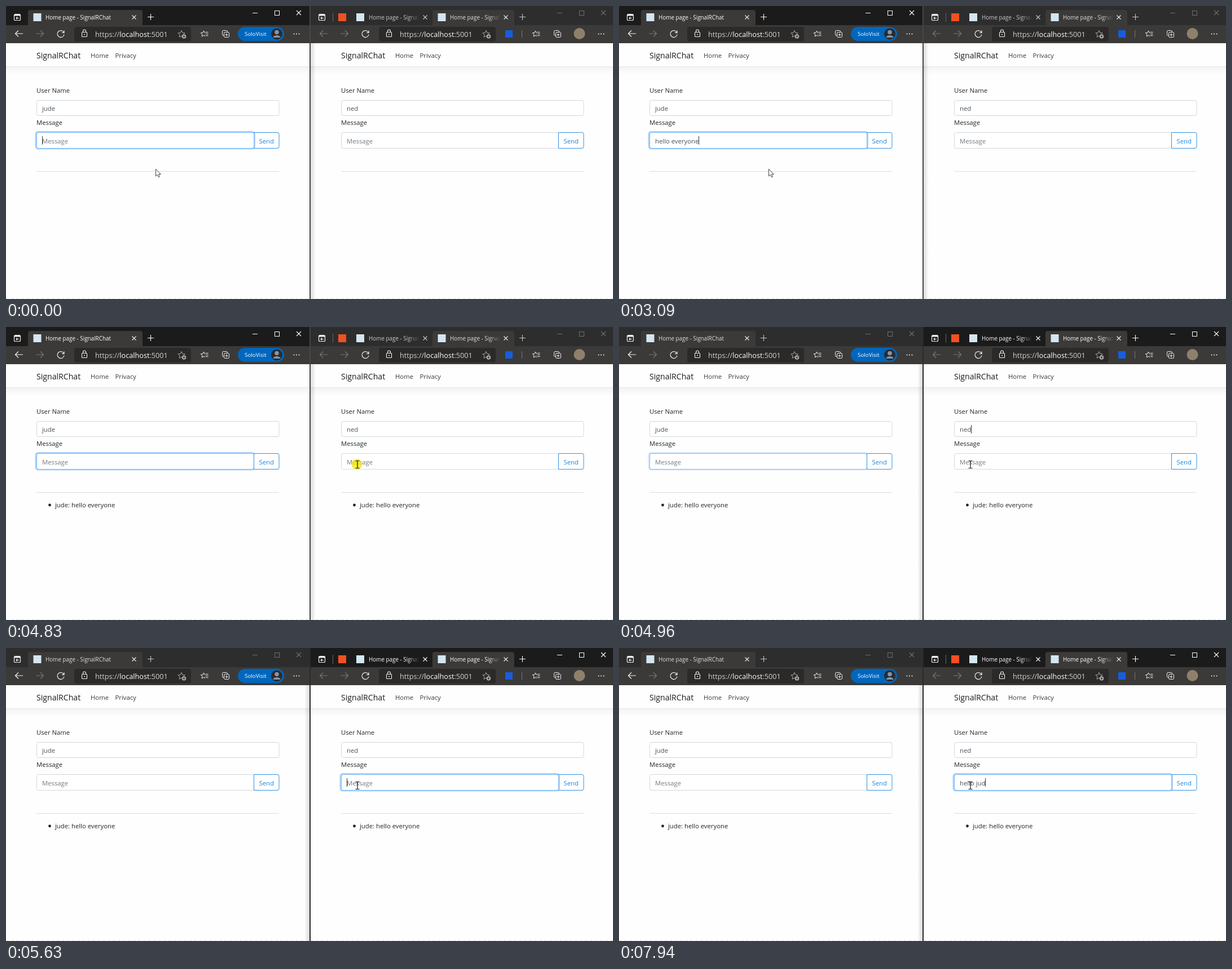
An HTML page with a canvas that plays this animation: 1076x520 px, repeating every 8 s.

```html
<!DOCTYPE html>
<html lang="en">
<head>
<meta charset="utf-8">
<title>SignalRChat</title>
<style>
  html, body { margin: 0; width: 100%; height: 100%; overflow: hidden; background: #fff; }
  canvas { display: block; }
</style>
</head>
<body>
<canvas id="stage" width="1076" height="520"></canvas>
<script>
const ctx = document.getElementById('stage').getContext('2d');
const LOOP = 8000;
const USERS = ['jude', 'ned'];
const MESSAGES = ['hello everyone', 'hello jude'];
// Time at which each character is typed
const KEYS = [
  [620, 790, 1000, 1130, 1360, 1440, 1740, 1970, 2070, 2280, 2560, 2810, 2940, 3090],
  [6160, 6340, 6470, 6620, 6800, 6930, 7480, 7660, 7940]
];
const SENT = 3550, RECEIVED = 3610, BLUR = 4830, SWITCH = 4880, FOCUS = 5140;
const POINTER = [
  [0, 265, 289], [4030, 325, 279], [4080, 430, 281], [4130, 553, 289], [4170, 631, 293],
  [4380, 631, 286], [4430, 629, 272], [4490, 626, 258], [4540, 623, 247], [4600, 623, 244]
];
const BODY = 11.3;

const between = (t, a, b) => t >= a && t < b;
const ramp = (t, a, b) => Math.min(1, Math.max(0, (t - a) / (b - a)));

function rect(x, y, w, h, color) {
  ctx.fillStyle = color;
  ctx.fillRect(x, y, w, h);
}

function rounded(x, y, w, h, r, fill, stroke, width = 1) {
  ctx.beginPath();
  ctx.roundRect(x, y, w, h, r);
  if (fill) { ctx.fillStyle = fill; ctx.fill(); }
  if (stroke) { ctx.strokeStyle = stroke; ctx.lineWidth = width; ctx.stroke(); }
}

function disc(x, y, r, color) {
  ctx.fillStyle = color;
  ctx.beginPath();
  ctx.arc(x, y, r, 0, 7);
  ctx.fill();
}

function path(d, x, y, color, width = 1.1, fill) {
  ctx.save();
  ctx.translate(x, y);
  const shape = new Path2D(d);
  if (fill) { ctx.fillStyle = fill; ctx.fill(shape); }
  ctx.strokeStyle = color;
  ctx.lineWidth = width;
  ctx.stroke(shape);
  ctx.restore();
}

// Returns the x position where the text ends
function text(s, x, y, size, color) {
  ctx.font = `${size}px "Open Sans", "Noto Sans", sans-serif`;
  ctx.fillStyle = color;
  ctx.fillText(s, x, y);
  return x + ctx.measureText(s).width;
}

function star(x, y, r, color) {
  let d = '';
  for (let i = 0; i < 10; i++) {
    const a = i * Math.PI / 5 - Math.PI / 2, k = i % 2 ? r * 0.48 : r;
    d += `${i ? 'L' : 'M'}${Math.cos(a) * k} ${Math.sin(a) * k}`;
  }
  path(d + 'Z', x, y, color, 1);
}

function favicon(x) {
  rect(x, 13, 14, 14, '#d3e7f1');
}

function tabTitle(x, color, clipWidth) {
  ctx.save();
  if (clipWidth) {
    ctx.beginPath();
    ctx.rect(x, 8, clipWidth, 25);
    ctx.clip();
    const fade = ctx.createLinearGradient(x + clipWidth - 18, 0, x + clipWidth, 0);
    fade.addColorStop(0, color);
    fade.addColorStop(1, 'rgba(200,200,200,0.1)');
    color = fade;
  }
  text('Home page - SignalRChat', x, 24, 9.87, color);
  ctx.restore();
}

const closeIcon = (x, y, r, color) =>
  path(`M${-r} ${-r}L${r} ${r}M${r} ${-r}L${-r} ${r}`, x, y, color);

function tabActions(x, color) {
  rounded(x - 5.5, 14.5, 11, 11, 2, null, color, 1.2);
  rect(x - 5, 15, 10, 2.5, color);
  path('M3 1.5H-2M0 -.5L-2 1.5L0 3.5', x, 20, color);
}

function titleBar(x, active, second) {
  const ink = active ? '#fff' : '#c8c8c8';
  const buttons = active ? '#fff' : '#6f6f6f';
  rect(x, 0, 540, 34, active ? '#1b1b1b' : '#2d2d2d');
  tabActions(x + 20, '#eee');
  const tabX = second ? 756 : 39, tabW = second ? 145 : 203;
  rounded(tabX, 7, tabW, 30, 4, '#3b3a39');
  if (second) {
    rect(579, 12, 1, 16, '#666');
    rect(589, 13, 14, 14, '#f25022');
    favicon(621);
    tabTitle(643, ink, 88);
    closeIcon(743, 20, 3.5, ink);
  }
  favicon(tabX + 9.5);
  tabTitle(second ? 787 : 70, active ? '#fff' : '#dedede', second ? 88 : 0);
  closeIcon(second ? 886 : 227, 20, 3.5, '#eee');
  path('M-5.5 0H5.5M0 -5.5V5.5', second ? 915.5 : 256.5, 19.5, ink);
  path('M-4.5 0H4.5', x + 441.5, 12.5, buttons, 1);
  ctx.strokeStyle = buttons;
  ctx.lineWidth = 1;
  ctx.strokeRect(x + 476.5, 8.5, 8, 8);
  closeIcon(x + 519, 12, 4, buttons);
}

function toolbar(x, second) {
  const white = '#f4f4f4', dim = '#777';
  rect(x, 34, 540, 32, '#3b3a39');
  path('M7 0H-6.5M-1 -5.5L-6.5 0L-1 5.5', x + 23, 49, second ? dim : white, 1.2);
  path('M-7 0H6.5M1 -5.5L6.5 0L1 5.5', x + 60, 49, dim, 1.2);
  path('M5.7 -2A6 6 0 1 0 6 1M6 -6V-2H2', x + 97, 49.5, white, 1.2);

  rounded(x + 121, 37, 207, 26, 4, '#2b2a29');
  rounded(x + 134.5, 46.5, 9, 8, 1, null, white, 1.1);
  path('M-2.5 -3V-5A2.5 2.5 0 0 1 2.5 -5V-3', x + 139, 49.5, white);
  disc(x + 139, 50.5, 1, white);
  let end = text('https://', x + 158, 55, 12.7, '#d0d0d0');
  end = text('localhost', end, 55, 12.7, '#fff');
  text(':5001', end, 55, 12.7, '#d0d0d0');
  star(x + 311, 50, 6.5, '#aaa');
  disc(x + 315.5, 54, 3.8, '#aaa');
  path('M-2 0H2M0 -2V2', x + 315.5, 54, '#2b2a29', 1);

  const favorites = second ? 940 : 352, collections = second ? 977 : 389;
  star(favorites - 1.5, 49.5, 5.5, white);
  rect(favorites + 1, 46, 7, 9, '#3b3a39');
  path('M1.5 -2.5H6.5M2 .5H6.5M2 3.5H6.5', favorites, 49, white);
  rounded(collections - 5.5, 43.5, 9, 9, 2, null, white);
  rounded(collections - 2.5, 46.5, 9, 9, 2, '#3b3a39', white);
  path('M-2.5 0H2.5M0 -2.5V2.5', collections + 2, 51, white, 1);

  if (second) {
    rect(885, 43, 13, 13, '#175ddc');
    rect(914, 43, 1, 13, '#777');
    disc(1016.5, 49, 10, '#8f806c');
  } else {
    rounded(411, 37, 82, 25, 12.5, '#0067be');
    text('SoloVisit', 423, 53, 9.8, '#fff');
    disc(480, 49.5, 10, '#292b31');
    disc(480, 46.5, 3.8, '#8795a5');
    ctx.beginPath();
    ctx.ellipse(480, 56, 6.5, 4, 0, Math.PI, 0);
    ctx.fill();
  }
  for (const dx of [-4.5, 0, 4.5]) disc(x + 515 + dx, 49.5, 1, white);
}

function caret(x, y) {
  rect(Math.round(x), y, 1, 15, '#333');
}

function messageBox(x, focus, above) {
  const field = () => {
    if (focus > 0) rounded(x + 53, 223.5, 387.5, 29.5, 4, null, `rgba(70,155,245,${0.45 * focus})`, 3);
    rounded(x + 54.5, 224.5, 385, 28, 3, '#fff', '#d3d8dd');
    if (focus > 0) {
      ctx.globalAlpha = Math.min(1, focus * 3);
      rounded(x + 54.5, 224.5, 385, 28, 3, null, '#7ab8f5');
      ctx.globalAlpha = 1;
    }
  };
  const button = () => rounded(x + 439.5, 224.5, 44.5, 28, [0, 3, 3, 0], '#fff', '#2f91e3');
  if (above) { button(); field(); } else { field(); button(); }
  text('Send', x + 448.5, 243.5, BODY, '#1b87e0');
}

function page(side, t) {
  const x = side * 540;
  rect(x, 66, 540, 454, '#fefefe');
  const shadow = ctx.createLinearGradient(0, 108, 0, 122);
  shadow.addColorStop(0, 'rgba(0,0,0,.045)');
  shadow.addColorStop(1, 'rgba(0,0,0,0)');
  rect(x, 108, 540, 14, shadow);
  rect(x, 107, 540, 1, '#e3e6e9');
  text('SignalRChat', x + 54, 92.5, 14.1, '#1b1b1b');
  text('Home', x + 150, 91.5, BODY, '#343a40');
  text('Privacy', x + 193.5, 91.5, BODY, '#343a40');

  text('User Name', x + 54, 154, BODY, '#212529');
  rounded(x + 54.5, 167.5, 429.5, 27, 3, '#fff', '#d3d8dd');
  const nameEnd = text(USERS[side], x + 64, 186, BODY, '#495057');
  if (side && between(t, SWITCH, FOCUS)) caret(nameEnd, 174);

  text('Message', x + 54, 211, BODY, '#212529');
  const focus = side ? ramp(t, FOCUS - 50, 5190) : 1 - ramp(t, BLUR, 5080);
  messageBox(x, focus, side ? t >= FOCUS : t < BLUR);

  const cleared = !side && t >= SENT;
  const typed = cleared ? 0 : KEYS[side].filter(k => t >= k).length;
  let end = x + 64;
  if (typed) end = text(MESSAGES[side].slice(0, typed), end, 243.5, BODY, '#495057');
  else text('Message', end, 243.5, BODY, '#737a80');
  const caretOn = side
    ? between(t, FOCUS, 6110) || typed
    : t < 290 || typed || between(t, SENT, 4030) || between(t, 4560, 4780);
  if (caretOn) caret(end, 231);

  rect(x + 54, 293, 430, 1, '#dedede');
  if (t >= (side ? RECEIVED : SENT)) {
    disc(x + 77.5, 316, 2.4, '#212529');
    text(`${USERS[0]}: ${MESSAGES[0]}`, x + 87, 320, BODY, '#212529');
  }
}

function pointer(t) {
  const [, x, y] = POINTER.filter(p => t >= p[0]).pop();
  if (between(t, 4780, 4930) || between(t, 5520, 5630)) disc(x - 1, y - 0.5, 9.5, 'rgba(242,232,20,.82)');
  if (x > 594 && y < 254) {
    path('M-3.5 -6.5H-1L0 -6L1 -6.5H3.5M0 -6V6M-3.5 6.5H-1L0 6L1 6.5H3.5', x, y, '#111', 1.2);
  } else {
    path('M.5 .5V13L3.4 10.3L5.3 14.8L7.4 13.9L5.5 9.5H9.3Z', x, y, '#444', 1, '#fff');
  }
}

function draw(t) {
  const leftActive = t < SWITCH;
  for (const side of [0, 1]) {
    page(side, t);
    titleBar(side * 540, side ? !leftActive : leftActive, side === 1);
    toolbar(side * 540, side === 1);
  }
  const edge = leftActive ? 540 : 538, far = leftActive ? 549 : 529;
  const shade = ctx.createLinearGradient(edge, 0, far, 0);
  shade.addColorStop(0, 'rgba(0,0,0,.14)');
  shade.addColorStop(1, 'rgba(0,0,0,0)');
  rect(Math.min(edge, far), 66, 10, 454, shade);
  rect(538, 0, 2, 520, leftActive ? '#464646' : '#2a2a2a');
  for (let x = 0; x < 1076; x += 9) rect(x, 519, 5, 1, '#dcdcdc');
  pointer(t);
}

function tick() {
  draw(performance.now() % LOOP);
  requestAnimationFrame(tick);
}
tick();
</script>
</body>
</html>
```
